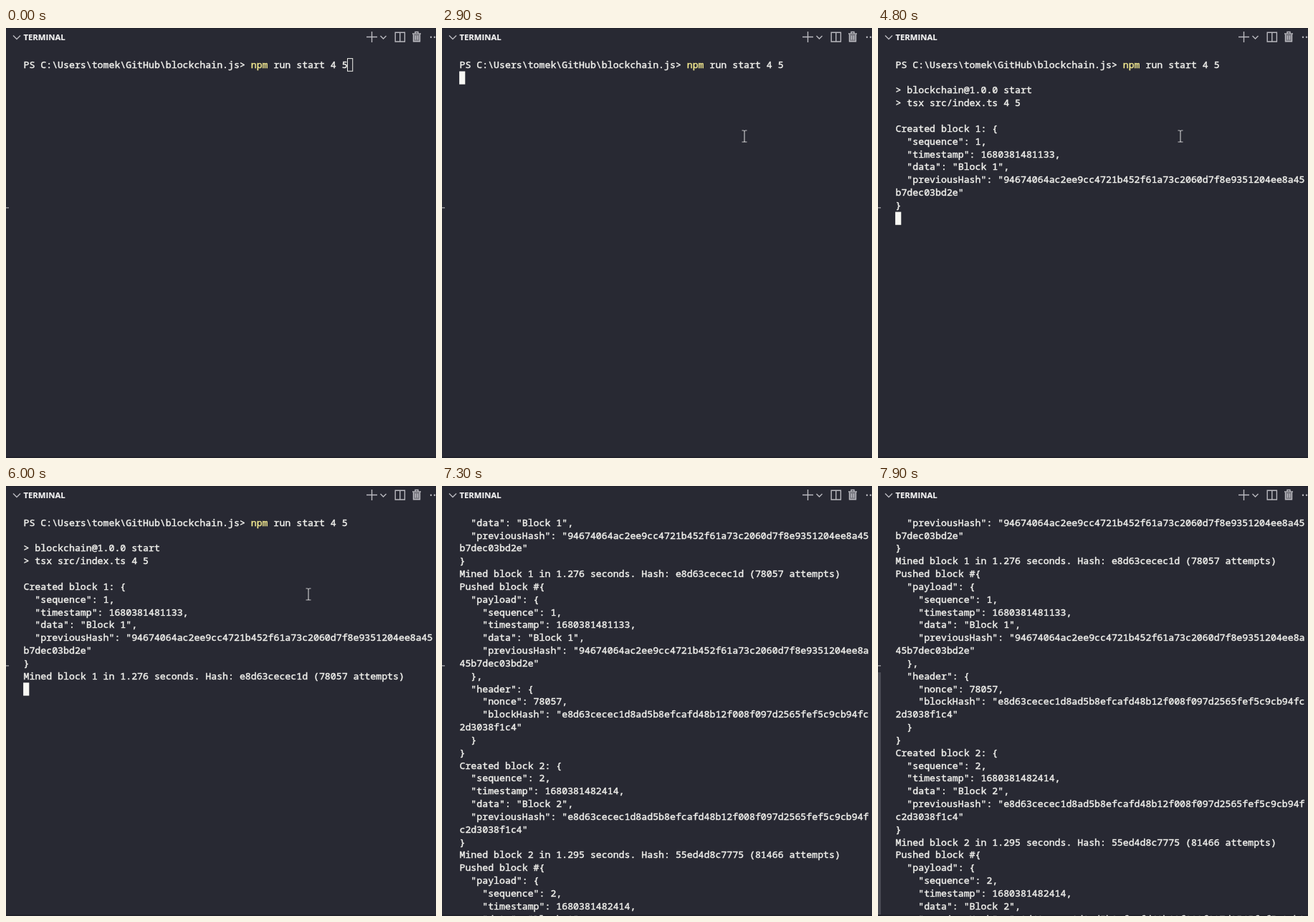
These frames come from a looping animation (600x600 px, 8000 ms). An HTML page:

```html
<!DOCTYPE html>
<html lang="en">
<head>
<meta charset="utf-8">
<title>Terminal</title>
<style>
  html, body { margin: 0; width: 100%; height: 100%; overflow: hidden; background: #282933; }
  svg { display: block; width: 100vw; height: 100vh; }
  .code {
    font: 500 13.22px "Noto Sans Mono", "DejaVu Sans Mono", monospace;
    fill: #f0f0ec; stroke: #f0f0ec; stroke-width: 0.45; white-space: pre;
  }
  .title { font: 700 11.3px "Open Sans", "Noto Sans", sans-serif; fill: #f2f2f2; stroke: #f2f2f2; stroke-width: 0.2; }
  .icon { fill: none; stroke: #b9b9bf; stroke-width: 1.4; }
  .cmd { fill: #f0e68f; stroke: #f0e68f; }
</style>
</head>
<body>
<svg viewBox="0 0 600 600">
  <rect width="600" height="600" fill="#282933"/>
  <rect width="600" height="1" fill="#21222b"/>
  <rect y="598" width="600" height="2" fill="#21222b"/>

  <path class="icon" d="M10 10.5l5 5 5-5"/>
  <text class="title" x="24.5" y="17">TERMINAL</text>
  <g class="icon">
    <path d="M503 12.5h15M510.5 5v15"/>
    <path d="M522.5 11l4 4 4-4"/>
    <path d="M543.2 6.2h13.2v12.8h-13.2zM549.8 6.2v12.8"/>
    <path d="M567 8h12M571 7.5v-2h4v2"/>
    <path d="M568.5 8.5v10.3h9v-10.3M571.5 10.5v6M574.5 10.5v6" fill="#77777f"/>
  </g>
  <g fill="#b9b9bf">
    <circle cx="593" cy="12.7" r="1.2"/>
    <circle cx="598" cy="12.7" r="1.2"/>
  </g>

  <rect id="slider" width="4" fill="#4a4b54"/>
  <rect y="250" width="4" height="1.6" fill="#8e8e93"/>
  <g id="screen"></g>
  <rect id="caret"/>
  <path id="mouse" fill="none" stroke="#c4c4c6" stroke-width="1.2"
    d="M-3.5-8h2q1.5 0 1.5 1.5q0-1.5 1.5-1.5h2M0-6.5v13M-3.5 8h2q1.5 0 1.5-1.5q0 1.5 1.5 1.5h2"/>
</svg>
<script>
const LOOP = 8000, STEP = 100;
const LEFT = 24.5, PITCH = 17.83, CHAR = 7.93, COLS = 72;
const PROMPT = 'PS C:\\Users\\tomek\\GitHub\\blockchain.js> ';
const ARGS = ' run start 4 5';
const $ = id => document.getElementById(id);

const hash0 = '94674064ac2ee9cc4721b452f61a73c2060d7f8e9351204ee8a45b7dec03bd2e';
const hash1 = 'e8d63cecec1d8ad5b8efcafd48b12f008f097d2565fef5c9cb94fc2d3038f1c4';

const fields = (n, time, prev, pad) => [
  `"sequence": ${n},`, `"timestamp": ${time},`,
  `"data": "Block ${n}",`, `"previousHash": "${prev}"`
].map(s => pad + s);
const created = (n, time, prev) =>
  [`Created block ${n}: {`, ...fields(n, time, prev, '  '), '}'];
const mined = (n, secs, hash, tries) =>
  `Mined block ${n} in ${secs} seconds. Hash: ${hash} (${tries} attempts)`;
const payload = (n, time, prev) =>
  ['Pushed block #{', '  "payload": {', ...fields(n, time, prev, '    ')];

const time1 = 1680381481133, time2 = 1680381482414;
const lines = [
  PROMPT + 'npm' + ARGS, '',
  '> blockchain@1.0.0 start', '> tsx src/index.ts 4 5', '',
  ...created(1, time1, hash0),
  mined(1, 1.276, 'e8d63cecec1d', 78057),
  ...payload(1, time1, hash0), '  },',
  '  "header": {', '    "nonce": 78057,', `    "blockHash": "${hash1}"`, '  }', '}',
  ...created(2, time2, hash1),
  mined(2, 1.295, '55ed4d8c7775', 81466),
  ...payload(2, time2, hash1)
];
const rows = lines.flatMap(s => s.match(new RegExp(`.{1,${COLS}}`, 'g')) || ['']);

// [start, rows printed, rows scrolled away]
const output = [
  [0, 1, 0], [2900, 1, 0], [4400, 5, 0], [4800, 12, 0], [6000, 13, 0],
  [6100, 34, 0], [7200, 35, 0], [7300, rows.length, 8], [7400, rows.length, 9]
];
// [time, x, y]
const track = [[900, 161, 190], [1100, 272, 201], [1200, 272, 201], [1500, 422, 151],
  [7100, 422, 151], [7200, 416, 155]];

function place(t) {
  const i = track.findIndex(p => p[0] >= t);
  if (i < 1) return i ? track[track.length - 1].slice(1) : track[0].slice(1);
  const [a, b] = [track[i - 1], track[i]];
  const k = (t - a[0]) / (b[0] - a[0]);
  return [a[1] + (b[1] - a[1]) * k, a[2] + (b[2] - a[2]) * k];
}

const nodes = rows.map((s, i) => {
  const el = document.createElementNS('http://www.w3.org/2000/svg', 'text');
  el.setAttribute('class', 'code');
  el.setAttribute('x', LEFT);
  el.setAttribute('xml:space', 'preserve');
  if (i) el.textContent = s;
  else el.innerHTML = PROMPT.replace('>', '&gt;') + '<tspan class="cmd">npm</tspan>' + ARGS;
  $('screen').append(el);
  return el;
});

function set(el, attrs) {
  for (const k in attrs) el.setAttribute(k, attrs[k]);
}

function draw(t) {
  const [, count, scroll] = output.filter(o => o[0] <= t).pop();
  nodes.forEach((el, i) => set(el, {
    y: Math.round(55.8 + (i - scroll) * PITCH),
    visibility: i >= scroll && i < count ? 'visible' : 'hidden'
  }));

  const typing = t < 2900, focus = t >= 1100;
  const row = typing ? 0 : count;
  set($('caret'), {
    x: LEFT + (typing ? rows[0].length * CHAR : 0) - (focus ? 0.4 : 0),
    y: 42.6 + (row - scroll) * PITCH,
    width: focus ? 8.2 : 7.2,
    height: focus ? 18.2 : 17.6,
    fill: focus ? '#f8f8f4' : 'none',
    stroke: focus ? 'none' : '#f0f0ec',
    visibility: t < 7300 ? 'visible' : 'hidden'
  });

  const [x, y] = place(t);
  set($('mouse'), {
    transform: `translate(${x} ${y})`,
    visibility: t >= 900 && t < 7300 ? 'visible' : 'hidden'
  });

  const top = t < 7900 ? 119 : 260;
  set($('slider'), {
    y: top, height: 598 - top,
    opacity: Math.max(0, Math.min(1, (t - 7300) / 300))
  });
}

let start;
function tick(now) {
  start ??= now;
  draw(Math.floor((now - start) % LOOP / STEP) * STEP);
  requestAnimationFrame(tick);
}
draw(0);
requestAnimationFrame(tick);
</script>
</body>
</html>
```
